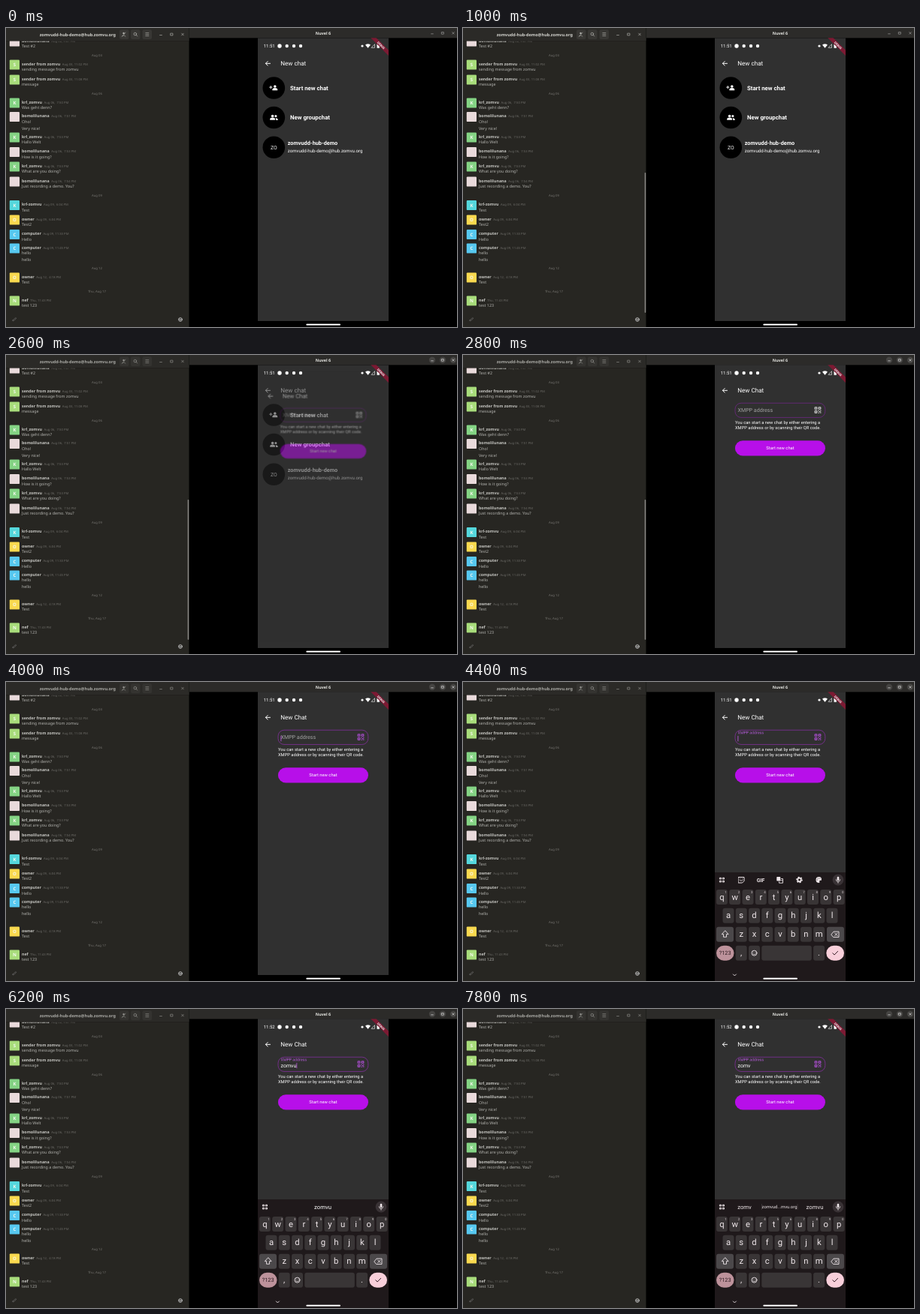
Recreate the animation shown at these times as an HTML page. Size 600 px wide and 399 px high, loop 8000 ms.

```html
<!DOCTYPE html>
<html lang="en">
<head>
<meta charset="utf-8">
<title>New chat</title>
<style>
html, body { margin: 0; width: 100%; height: 100%; overflow: hidden; background: #000; }
svg { display: block; width: 100vw; height: 100vh; text-rendering: geometricPrecision; }
text { white-space: pre; }
.desk { font-family: "Noto Sans", sans-serif; fill: #b4b4b0; }
.phone { font-family: Roboto, sans-serif; fill: #fff; }
.b { font-weight: 700; }
.mid { text-anchor: middle; }
.line { fill: none; stroke: currentColor; stroke-linecap: round; stroke-linejoin: round; }

.cut, .type, .cursor { animation: 8s step-end infinite; }
.scroll { animation-name: scroll; }
@keyframes scroll { 0% { opacity: 0 } 7.5% { opacity: 1 } 40%, 100% { opacity: 0 } }
.active { animation-name: active; }
@keyframes active { 0% { opacity: 1 } 27.5%, 100% { opacity: .75 } }
.controls { animation-name: controls; }
@keyframes controls { 0% { color: #a5a5a5 } 27.5%, 100% { color: #ececec } }
.rounds { animation-name: rounds; }
@keyframes rounds { 0% { opacity: 0 } 27.5%, 100% { opacity: 1 } }

.page { animation: page 8s linear infinite; transform-origin: 422px 212px; }
@keyframes page {
  0%, 31% { opacity: 0; transform: scale(.9) }
  33.8%, 100% { opacity: 1; transform: none }
}
.field { animation-name: field; }
@keyframes field { 0% { stroke: #6f2784 } 48.5%, 100% { stroke: #832f9d } }
.scan { animation-name: scan; }
@keyframes scan { 0% { color: #d8d8d8 } 48.5%, 100% { color: #b04fd6 } }
.label { animation: label 8s ease-out infinite; transform-origin: 365.5px 75.5px; }
@keyframes label {
  0%, 50.6% { transform: none; fill: #a2a2a2 }
  53%, 100% { transform: translateY(-6.5px) scale(.74); fill: #bb5fe0 }
}
.cursor { animation-name: cursor; }
@keyframes cursor {
  0% { opacity: 0; transform: none }
  48.5% { opacity: 1; transform: none }
  62% { transform: translateX(3.5px) }
  64.5% { transform: translateX(7.5px) }
  69.5% { transform: translateX(13.6px) }
  72% { transform: translateX(17px) }
  74.5% { opacity: 1; transform: translateX(20.8px) }
  81% { opacity: 0 }
  87% { opacity: 1 }
  92% { opacity: 1; transform: translateX(17px) }
  96%, 100% { opacity: 0; transform: translateX(17px) }
}
.keyboard { animation: keyboard 8s cubic-bezier(.2, .7, .3, 1) infinite; }
@keyframes keyboard {
  0%, 50.6% { transform: translateY(146px) }
  54%, 100% { transform: none }
}
.before { animation-name: before; }
@keyframes before { 0% { opacity: 1 } 58.5%, 100% { opacity: 0 } }
.after { animation-name: after; }
@keyframes after { 0% { opacity: 0 } 58.5%, 100% { opacity: 1 } }
.tools { animation-name: tools; }
@keyframes tools { 0% { opacity: 1 } 62%, 100% { opacity: 0 } }
.guess { animation-name: guess; }
@keyframes guess { 0% { opacity: 0 } 62% { opacity: 1 } 92%, 100% { opacity: 0 } }
.guesses { animation-name: guesses; }
@keyframes guesses { 0% { opacity: 0 } 92%, 100% { opacity: 1 } }
.t0 { animation-name: t0; } @keyframes t0 { 0% { fill: transparent } 62%, 100% { fill: #fff } }
.t1 { animation-name: t1; } @keyframes t1 { 0% { fill: transparent } 64.5%, 100% { fill: #fff } }
.t2 { animation-name: t2; } @keyframes t2 { 0% { fill: transparent } 69.5%, 100% { fill: #fff } }
.t3 { animation-name: t3; } @keyframes t3 { 0% { fill: transparent } 72%, 100% { fill: #fff } }
.t4 { animation-name: t4; }
@keyframes t4 { 0% { fill: transparent } 74.5% { fill: #fff } 92%, 100% { fill: transparent } }
</style>
</head>
<body>
<svg id="stage" viewBox="0 0 600 399" preserveAspectRatio="none"></svg>
<script>
const text = (x, y, size, str, cls = "", fill = "") =>
  `<text x="${x}" y="${y}" font-size="${size}" class="${cls}"${fill && ` fill="${fill}"`}>${str}</text>`;
const rect = (x, y, w, h, fill, r = 0, extra = "") =>
  `<rect x="${x}" y="${y}" width="${w}" height="${h}" rx="${r}" fill="${fill}" ${extra}/>`;
const dot = (x, y, r, fill = "#fff") => `<circle cx="${x}" cy="${y}" r="${r}" fill="${fill}"/>`;
const line = (d, width = .8, color = "currentColor") =>
  `<path class="line" d="${d}" style="stroke:${color}" stroke-width="${width}"/>`;
const ring = (x, y, r, width = .8, color = "currentColor") =>
  `<circle class="line" cx="${x}" cy="${y}" r="${r}" style="stroke:${color}" stroke-width="${width}"/>`;
const group = (cls, ...parts) => `<g class="${cls}">${parts.join("")}</g>`;

const lime = "#a8dc7b", green = "#84d384", cyan = "#55d7dc", yellow = "#fad94f", blue = "#57c8f0";
const tints = { "sender from zomvu": lime, krl_zomvu: green, "krl-zomvu": cyan, owner: yellow, computer: blue, nef: lime };
const friend = "bomolilunana", room = "zomvudd-hub-demo", address = room + "@hub.zomvu.org";

const days = [[36, "Aug 03"], [87, "Aug 06"], [223, "Aug 09"], [320, "Aug 12"], [351, "Thu, Aug 17"]];
const messages = [
  [17, friend, "Aug 02, 9:41 PM", "Test #2"],
  [48, "sender from zomvu", "Aug 03, 11:02 PM", "sending message from zomvu"],
  [68, "sender from zomvu", "Aug 03, 11:08 PM", "message"],
  [99, "krl_zomvu", "Aug 06,  7:50 PM", "Was geht denn?"],
  [117.5, friend, "Aug 06,  7:51 PM", "Oho!", "Very nice!"],
  [145, "krl_zomvu", "Aug 06,  7:53 PM", "Hallo Welt"],
  [164.5, friend, "Aug 06,  7:53 PM", "How is it going?"],
  [184, "krl_zomvu", "Aug 06,  7:53 PM", "What are you doing?"],
  [204, friend, "Aug 06,  7:54 PM", "Just recording a demo. You?"],
  [235.5, "krl-zomvu", "Aug 09,  6:04 PM", "Test"],
  [255, "owner", "Aug 09,  6:04 PM", "Test2"],
  [274.5, "computer", "Aug 09, 11:33 PM", "Hello"],
  [293, "computer", "Aug 09, 11:45 PM", "hello", "hello"],
  [332, "owner", "Aug 12,  4:18 PM", "Test"],
  [363, "nef", "Thu, 11:43 PM", "test 123"]
];

function message([y, name, time, first, second]) {
  const known = tints[name];
  return rect(4.8, y - 5.6, 13.2, 13.2, known || "#e9dadb", 1.2)
    + (known ? text(11.4, y + 3.2, 6, name[0].toUpperCase(), "b mid", "#f4f8ee") : "")
    + `<text x="21" y="${y + 1.7}" font-size="5.3"><tspan class="b" fill="#c6c6c2">${name}</tspan>`
    + `<tspan dx="2.5" font-size="4.2" fill="#6c6b67">${time}</tspan></text>`
    + text(21, y + 9.1, 5.35, first)
    + (second ? text(21, y + 18.4, 5.35, second) : "");
}

const windowButtons = (x, y, gap, s) => line(
  `M${x - s} ${y + 1}h${2 * s}M${x + gap - s} ${y - s}h${2 * s}v${2 * s}h${-2 * s}z`
  + `M${x + 2 * gap - s} ${y - s}l${2 * s} ${2 * s}m0 ${-2 * s}l${-2 * s} ${2 * s}`, .65);

const desktop = group("desk",
  rect(0, 0, 243.5, 399, "#272622"),
  ...messages.map(message),
  ...days.map(([y, day]) => text(121, y + 1.6, 4.3, day, "mid", "#74736f")),
  rect(0, 0, 243.5, 17, "#2b2a27"), rect(0, 17, 243.5, .5, "#1c1b19"),
  `<g class="cut active" color="#b5b5b0">`,
  text(95.3, 10.6, 5.5, address, "b mid", "#d2d2cd"),
  ...[151, 166, 181.5].map(x => rect(x, 2.2, 12.5, 12.8, "#383734", 2)),
  dot(156.5, 7, 1.2, "#b5b5b0"),
  line("M154 11.2q2.5-3 5 0M159 6l-4 5", .6), ring(171.8, 8, 1.8, .7), line("M173.2 9.4l1.5 1.5", .7),
  line("M185.8 6.5h4m-4 2h4m-4 2h4", .6), windowButtons(206, 8.5, 14.5, 1.4), `</g>`,
  line("M9 390l3.3-3q1.5-.7 1.2.8l-3.3 3q-1.6.8-1.2-.8z", .6, "#777"),
  ring(232, 389, 2.4, .9, "#bbb"), line("M230 388.7h4m-3 1.3h2", .8, "#bbb"),
  group("cut scroll", rect(241.7, 193, 1.5, 187, "#8a8985", .7)));

const phoneWindow = group("desk",
  rect(244, 0, 356, 13.3, "#2c2b29"),
  text(422, 8.8, 5.4, "Nuvel 6", "b mid", "#e6e6e2"),
  group("cut rounds", ...[567, 581, 595].map(x => dot(x, 6.8, 4.2, "#454442"))),
  group("cut controls", windowButtons(567, 6.8, 14, 1.3)));

const header = title => line("M351.5 47.3h-6m2.7-2.8l-2.8 2.8 2.8 2.8", 1, "#fff") + text(365.3, 50.2, 8.1, title);
const person = (x, y) => dot(x, y - 2, 1.8) + `<path d="M${x - 3.4} ${y + 3.3}v-1q0-2.2 3.4-2.2t3.4 2.2v1z"/>`;
const screenFill = "#303030";

const contacts = group("", rect(335, 13.3, 174, 377.7, screenFill), header("New chat"),
  ...[80, 119.5, 159.3].map(y => dot(356.3, y, 14.8, "#000")),
  person(357.8, 80), line("M352.3 77.4v3.4m-1.7-1.7h3.4", .9, "#fff"),
  person(354.6, 119.5), dot(358.9, 117.6, 1.5), `<path d="M358.7 119.9q3 .3 3 2v1h-2.7v-1q0-1.2-.3-2z"/>`,
  text(356.3, 161.8, 6.8, "ZO", "mid"),
  text(378, 82.7, 7.8, "Start new chat", "b"), text(378, 122.4, 7.8, "New groupchat", "b"),
  text(374.7, 155.9, 7.3, room, "b"), text(374.7, 165.7, 6.1, address));

const scanIcon = group("cut scan",
  line("M468.2 69.7h2.6v2.6h-2.6zm5 0h2.6v2.6h-2.6zm-5 4.8h2.6v2.6h-2.6z", 1.1),
  line("M473 74.5h.2m1.3 1.2h.2m1 1.3h.2m-2.7.2h.2m2.3-2.7h.2", 1.3));
const typed = [..."zomvu"].map((c, i) => `<tspan class="type t${i}">${c}</tspan>`).join("");

const newChat = group("page", rect(335, 13.3, 174, 377.7, screenFill), header("New Chat"),
  rect(362, 64.2, 119.8, 19.2, "none", 8, `class="cut field" stroke-width=".8"`),
  text(365.5, 75.7, 7.1, "XMPP address", "label"), scanIcon,
  text(365.5, 78, 7, typed),
  group("cursor", rect(365.5, 71.8, .8, 7.4, "#c45aea")),
  text(362, 92.3, 5.75, "You can start a new chat by either entering a"),
  text(362, 99.3, 5.75, "XMPP address or by scanning their QR code."),
  rect(362, 114.2, 120, 20.2, "#b70fe9", 10.1),
  text(422, 126.4, 5.8, "Start new chat", "mid"));

const status = group("cut before", text(342.7, 26.3, 6, "11:51")) + group("cut after", text(342.7, 26.3, 6, "11:52"))
  + [364, 373.7, 383, 392].map((x, i) => dot(x, 24, i ? 2.2 : 2.7)).join("") + dot(474, 24, 1.6)
  + `<path d="M478 22.5q3.5-2.5 7 0l-3.5 4.3z"/>` + line("M486.5 26.3h4v-4.3z", .6, "#fff")
  + rect(493.5, 21.7, 3.4, 5, "#fff", .5)
  + `<g clip-path="url(#screen)"><g transform="translate(499 23.2) rotate(45)">`
  + rect(-30, -2.6, 60, 5.2, "#7c1a33") + text(0, 1.4, 3.9, "DEBUG", "b mid") + `</g></g>`;

const ink = "#efe7ea", keyTint = "#393536", modTint = "#4b484a";
const key = (x, y, w, label) => rect(x - w / 2, y, w, 20, keyTint, 3) + text(x, y + 13.6, 11.3, label, "mid", ink);
const keyRow = (letters, x, y, step) => [...letters].map((c, i) => key(x + i * step, y, 15, c)).join("");

const tools = group("cut tools",
  line("M366.5 260.5h7.5v5l-2.5 2.5h-5z", 1), line("M368 264.5q2 2 4 0M368.7 262.6h.1m2.7 0h.1", .8),
  text(396, 266.5, 7, "GIF", "b mid", ink),
  rect(417.3, 260, 5, 5.5, ink, .7), line("M423.5 262.5h2v5.7h-5v-1.5M422.7 264.8h1.8", .9),
  ring(447.5, 264, 2.3, 1.8), `<circle class="line" cx="447.5" cy="264" r="3.7" stroke-dasharray="1.2 2.67" stroke-width="1.2"/>`,
  `<path d="M473.5 260a4 4 0 1 0 0 8q1.5-.3.8-1.7t1-1.5h1.5q1-4.8-3.3-4.8z" fill="${ink}"/>`,
  ...[[471.2, 264], [472.3, 262], [474.8, 262]].map(([x, y]) => dot(x, y, .6, "#1f191b")));

const keyboard = group("keyboard", `<g color="${ink}">`,
  rect(335, 254, 174, 146, "#1f191b"),
  line("M341.8 261.3h1.7v1.7h-1.7zm4 0h1.7v1.7h-1.7zm-4 4h1.7v1.7h-1.7zm4 0h1.7v1.7h-1.7z", 1),
  tools,
  group("cut guess", text(421.5, 266.7, 7.7, typed, "mid")),
  group("cut guesses", text(374.5, 266.7, 7.7, "zomv", "mid", ink), text(421, 266.2, 5.9, "zomvud...mvu.org", "mid", ink),
    text(468, 266.7, 7.7, "zomvu", "mid", ink), line("M397.5 260.5v7M445 260.5v7", .5, "#574e52")),
  dot(499, 264, 7.4, "#393235"), rect(497.7, 259.7, 2.6, 5.3, ink, 1.3), line("M496.3 263.7q0 2.7 2.7 2.7t2.7-2.7M499 266.5v1.7", .8),
  keyRow("qwertyuiop", 344.4, 277, 17.3),
  ...[..."1234567890"].map((n, i) => text(349.6 + i * 17.3, 282, 4.4, n, "mid", "#d5cace")),
  keyRow("asdfghjkl", 353, 301.7, 17.25),
  keyRow("zxcvbnm", 370.2, 326.8, 17.25),
  rect(337, 326.8, 23, 20, modTint, 3), line("M348.5 332l-4.2 4.6h2.2v3.7h4v-3.7h2.2z", .9),
  rect(484, 326.8, 23, 20, modTint, 3), line("M490 336.8l3-3.7h7v7.4h-7zM494.7 335l3.4 3.6m0-3.6l-3.4 3.6", .9),
  rect(337, 351.7, 23.5, 20, "#bd929b", 10), text(348.7, 364.4, 7.3, "?123", "mid", "#2e1a20"),
  key(370.2, 351.7, 15, ","), key(387.5, 351.7, 15, ""), ring(387.5, 361.7, 3.5, .9),
  line("M385.6 362.8q1.9 2 3.8 0M386 360.5h.1m2.8 0h.1", .8),
  rect(397.3, 351.7, 66.5, 20, keyTint, 3), key(473.6, 351.7, 15, "."),
  rect(483.3, 351.7, 23.7, 20, "#f8cfda", 10), line("M491.8 361.8l2.3 2.3 4.5-4.7", 1, "#3b2029"),
  line("M359.4 390l2 2 2-2", .9), `</g>`);

document.getElementById("stage").innerHTML =
  `<clipPath id="screen"><rect x="335" y="13.3" width="174" height="386"/></clipPath>`
  + rect(0, 0, 600, 399, "#000") + desktop + phoneWindow
  + group("phone", `<g clip-path="url(#screen)">`, contacts, newChat, keyboard, `</g>`, status,
    rect(399.3, 394.8, 45.7, 2, "#fff", 1));
</script>
</body>
</html>
```
